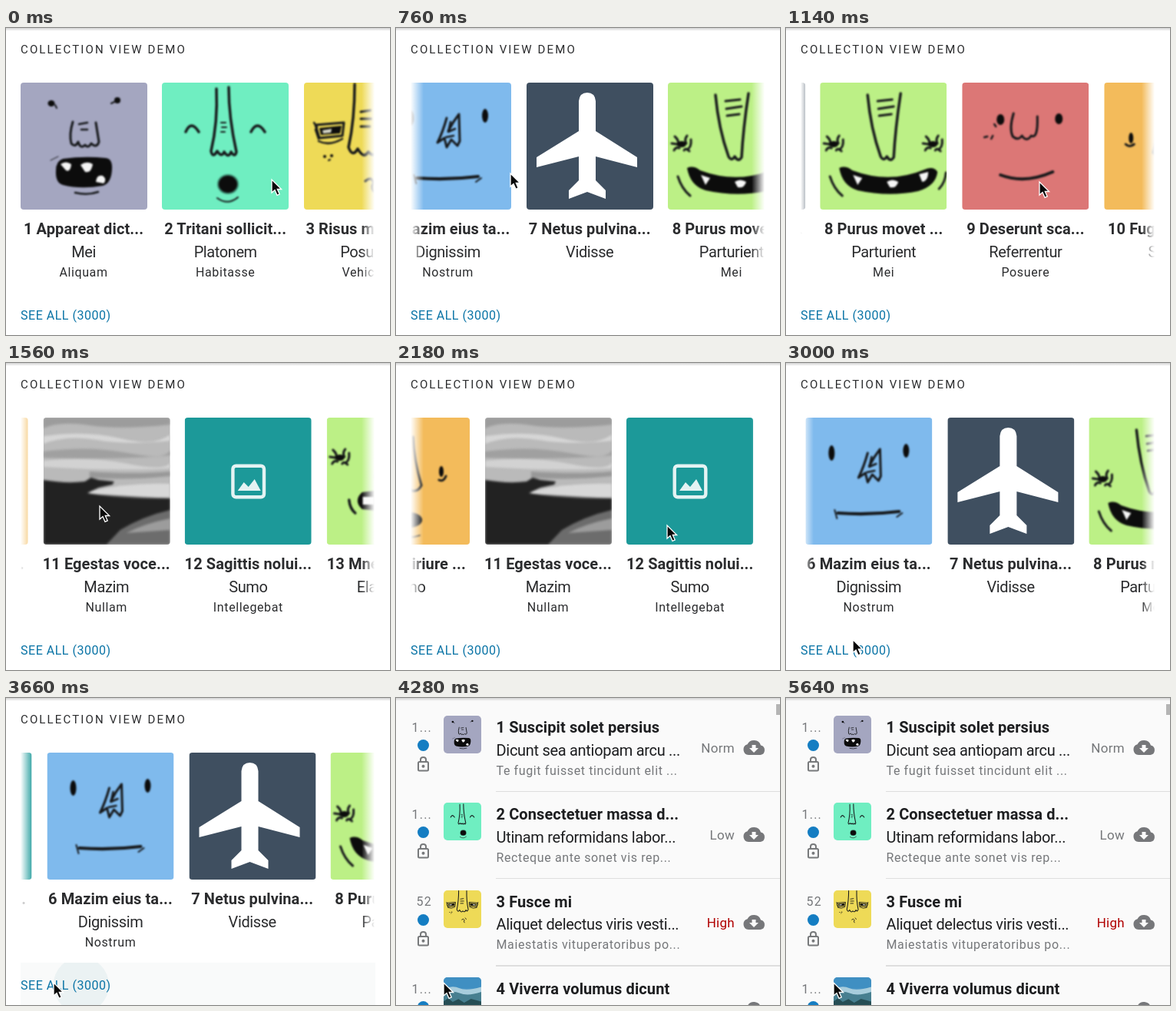
An HTML page for the animation above (5.66 s loop, 500 by 399 pixels).

```html
<!DOCTYPE html>
<html lang="la">
<head>
<meta charset="utf-8">
<title>Collection view demo</title>
<style>
  html, body { margin: 0; width: 100%; height: 100%; overflow: hidden; background: #fff; }
  #stage { position: relative; width: 500px; height: 399px; overflow: hidden; background: #fff;
    font: 16px/24px Roboto, "Open Sans", sans-serif; color: #2b2c2e; white-space: nowrap; }
  #stage div, #stage svg { position: absolute; }
  .edge { left: 0; top: 0; width: 500px; height: 4px; background: linear-gradient(#d2d2d2, #d2d2d200); }
  .head { left: 19px; top: 15.5px; font-size: 15px; letter-spacing: 2.14px; }
  .view { left: 18.5px; top: 71px; width: 461px; height: 265px; overflow: hidden; }
  .card { top: 0; width: 165px; text-align: center; }
  .card svg { left: 0; top: 0; width: 165px; height: 165px; border-radius: 4px; }
  .card div { left: -10px; width: 185px; }
  .t1 { font-size: 20px; font-weight: 700; letter-spacing: .1px; }
  .t2 { font-size: 20px; letter-spacing: -.4px; }
  .t3 { font-size: 16px; letter-spacing: .62px; }
  .card .t1 { top: 178px; } .card .t2 { top: 208px; } .card .t3 { top: 234.5px; }
  .fade { top: 0; width: 17px; height: 265px; }
  #fadeL { left: 0; background: linear-gradient(90deg, #fff, #fff0); }
  #fadeR { right: 0; background: linear-gradient(270deg, #fff, #fff0); }
  #hot { left: 19px; top: 344px; width: 462px; height: 55px; overflow: hidden; background: #f9fafa; }
  #ripple { left: -200px; top: -171px; width: 400px; height: 400px; border-radius: 50%; background: #ebf2f3; }
  .all { left: 19px; top: 361.5px; color: #0a74a6; letter-spacing: .52px; }
  #list { left: 0; top: 0; width: 500px; height: 399px; background: #fafafa; overflow: hidden; }
  .row { left: 0; width: 500px; height: 114px; color: #1d1e20; }
  .row .thumb { left: 62px; top: 23px; width: 49px; height: 49px; border-radius: 5px; }
  .row .t1, .row .t2, .row .t3 { left: 130.5px; }
  .row .t1 { top: 26px; } .row .t2 { top: 55.5px; } .row .t3 { top: 82.5px; color: #75777a; }
  .row .t2 { letter-spacing: -.3px; }
  .num { right: 453px; top: 26.5px; color: #75777a; letter-spacing: 1.2px; }
  .dot { left: 28px; top: 54px; width: 15px; height: 15px; border-radius: 50%; background: #147dc2; }
  .lock { left: 27px; top: 75px; width: 17px; height: 22px; }
  .cloud { left: 451px; top: 53px; width: 30px; height: 22px; }
  .prio { right: 59px; top: 53px; font-size: 17px; color: #75777a; letter-spacing: .3px; }
  .prio.High { color: #b00000; }
  .line { left: 130px; top: 120.5px; width: 370px; height: 1.5px; background: #dedede; }
  .bar { left: 495px; top: 8px; width: 5px; height: 14px; background: #b5b5b5; }
  #cursor { left: 0; top: 0; width: 18px; height: 24px; overflow: visible; }
</style>
</head>
<body>
<div id="stage">
  <div class="head">COLLECTION VIEW DEMO</div>
  <div class="view">
    <div id="strip"></div>
    <div class="fade" id="fadeL"></div>
    <div class="fade" id="fadeR"></div>
  </div>
  <div id="hot"><div id="ripple"></div></div>
  <div class="all">SEE ALL (3000)</div>
  <div id="list"></div>
  <div class="edge"></div>
  <svg id="cursor"><path d="M0 0V17L4 13.6 7 20.3 10.2 18.9 7.3 12.5H12.6Z" fill="#080808" stroke="#fff" stroke-width="1.3"/></svg>
</div>
<script>
const LOOP = 5660, PITCH = 184.7;
const $ = id => document.getElementById(id);

// Drawing helpers, all in a 165 x 165 square
const fill = (d, c = '#0c0c0c') => `<path d="${d}" fill="${c}"/>`;
const ink = (d, w = 3) =>
  `<path d="${d}" fill="none" stroke="#16181a" stroke-width="${w}" stroke-linecap="round" stroke-linejoin="round"/>`;
const oval = (x, y, rx, ry, c = '#0c0c0c') => `<ellipse cx="${x}" cy="${y}" rx="${rx}" ry="${ry}" fill="${c}"/>`;
const blur = (r, body) => `<g style="filter:blur(${r}px)">${body}</g>`;
const fuzzy = body => blur(.9, body);
const squint = (x, y) => `<g transform="translate(${x} ${y})">` +
  ink('M-9 -9Q-3 -4 -5 2M-13 0L-6 1M-10 9Q-8 4 -3 6M7 -10Q3 -5 6 0M12 -5Q13 5 7 8M3 9Q5 5 10 10') + oval(0, 1, 6, 4) + '</g>';
const glasses = (x, flip) => `<g transform="translate(${x} 63) scale(${flip} 1)">` +
  ink('M-18 -8L19 -11 17 6 -13 9Z') + fill('M-13 -4L16 -7 14 3 -11 5Z') + fill('M-9 -1L3 -3 2 2 -8 3Z', '#d6d7c8') +
  ink('M-20 -11L-16 -5M-14 13Q0 20 17 10M-18 -2L-14 10', 2.5) + '</g>';

const art = {
  violet: ['#a4a6c0', fuzzy(
    oval(40, 27, 4.5, 4) + ink('M45 29L47 33M118 27L122 25', 2) + oval(126, 23, 4, 4) +
    ink('M68 51Q63 67 66 79Q71 85 75 77Q78 87 84 81Q88 86 92 79Q99 86 102 77L98 52', 3) +
    ink('M76 54L87 52M79 61H87', 2.5) + ink('M39 101L49 96', 1) +
    fill('M55 99Q83 95 111 98Q120 99 119 113Q118 131 107 134Q78 139 55 133Q45 130 46 114Q46 102 55 99') +
    fill('M52 106Q59 101 66 106Q65 117 59 114ZM78 107Q86 101 94 106Q92 118 84 116ZM98 129Q99 119 107 121Q113 126 108 131Z', '#f4f4f4') +
    ink('M71 143Q87 147 101 142', 2.5))],
  mint: ['#6feec1', fuzzy(
    ink('M31 64Q38 48 48 64M116 64Q124 48 134 64', 3.5) +
    ink('M71 8Q73 52 64 89Q66 99 72 89Q78 98 81 90Q87 99 90 90Q95 98 97 90Q87 45 87 6', 3.5) +
    ink('M77 52H83M78 58H84M77 64H82', 2) + oval(86, 132, 14, 13, '#3c826c') + oval(86, 132, 12, 11) +
    ink('M72 150Q86 160 99 149', 2))],
  gold: ['#eeda57', fuzzy(
    glasses(33, 1) + glasses(131, -1) +
    ink('M66 2Q66 48 58 84Q63 98 70 86Q78 100 84 90Q92 99 98 86Q104 96 108 84Q100 48 101 2', 3.5) +
    ink('M74 38L87 36M74 47H88M74 57H86', 3) + oval(27, 96, 2, 2) + oval(36, 95, 2, 2) + ink('M32 101L34 100', 2) +
    ink('M80 128Q88 121 91 130Q87 136 91 141M95 121L99 126', 3))],
  lake: ['#5a9fca',
    fill('M0 0H165V50H0Z', '#3f8fc2') + fill('M0 50Q40 34 70 48T165 42V90H0Z', '#a8cddc') +
    fill('M0 75Q35 54 70 69T165 64V115H0Z', '#477f90') + fill('M0 105L20 92 40 108 65 95 90 111 120 94 165 106V165H0Z', '#264e55')],
  teal: ['#1c9999',
    '<rect x="62.7" y="62.7" width="40.6" height="40.6" rx="4" fill="none" stroke="#e4f3f3" stroke-width="4.4"/>' +
    fill('M69 95L77 84 83 90 91 80 99 95Z', '#e4f3f3')],
  sky: ['#7fbaed', fuzzy(
    oval(34, 46, 4, 10) + oval(131, 43, 4, 9) +
    ink('M81 46Q76 64 69 78L78 72 81 84 87 74 95 82 98 76 97 41Q89 51 83 63', 3) +
    ink('M86 51L83 64 92 60M80 71L90 69', 2.5) + ink('M42 124Q82 127 122 122', 4) +
    ink('M38 120L41 131M119 129L126 124', 2))],
  plane: ['#3f4f60', fill('M68 24Q69 13 79 13Q89 13 90 24V63L144 97V110L90 96V127L103 140V151L79 142 55 151V140L68 127V96L13 110V97L68 63Z', '#fff')],
  lime: ['#bcf086', fuzzy(
    squint(18, 79) + squint(147, 79) +
    ink('M62 16Q66 60 79 96Q83 103 87 96Q92 104 96 97Q98 60 105 14', 3.5) +
    ink('M75 24L94 22M76 34L96 31M77 43L93 41', 3) +
    fill('M25 111Q33 107 42 114Q90 132 136 113Q148 108 153 116Q151 134 128 141Q89 149 49 140Q29 134 25 111') +
    fill('M43 120L55 124 49 133ZM87 129Q94 124 102 129Q99 138 91 136ZM129 119L141 116Q141 128 133 129Z', '#f7f7f7') +
    ink('M13 122Q18 138 29 147M164 117Q163 130 155 138', 3))],
  fern: ['#bcf086', fuzzy(
    squint(17, 51) + squint(147, 51) +
    ink('M68 12Q70 50 64 78Q82 96 101 78Q95 45 98 12', 3.5) +
    fill('M46 97Q84 92 122 97Q132 108 122 119Q84 124 46 119Q34 108 46 97') +
    fill('M47 103H62V113H47ZM80 102H92V112H80Z', '#f7f7f7') + ink('M29 107Q30 118 37 124M137 107Q136 118 129 124', 3.5))],
  rose: ['#dc7776', fuzzy(
    oval(50, 48, 5, 7) + oval(126, 47, 5, 7) + ink('M42 54L44 57M29 71L33 70M38 73L40 69', 2.5) +
    ink('M67 40Q61 60 66 70Q73 76 78 69Q84 78 90 69Q99 74 98 44', 3) + ink('M50 120Q82 132 118 116', 4))],
  amber: ['#f3bb5b', fuzzy(
    oval(35, 72, 3, 7) + oval(128, 70, 3, 7) + ink('M28 80Q33 85 39 80M125 81Q131 84 134 76', 3) +
    ink('M72 24Q72 66 64 91Q75 99 82 92Q96 100 102 88Q92 55 91 25', 3) +
    oval(86, 133, 17, 10) + ink('M71 153Q86 158 100 153', 1.5))],
  shore: ['#bababa', blur(1.6,
    fill('M0 0H165V9Q100 16 60 10T0 14Z', '#9c9c9c') + fill('M0 24Q55 16 100 27T165 22V30Q110 36 70 29T0 34Z', '#d6d6d6') +
    fill('M0 44Q60 36 110 46T165 42V49Q100 55 0 52Z', '#a0a0a0') +
    fill('M0 56Q60 50 110 60T165 58V66Q100 70 0 64Z', '#d2d2d2') +
    fill('M60 70Q120 74 165 70V76Q110 82 60 78Z', '#989898') + fill('M60 96Q110 84 165 86V103Q100 105 60 99Z', '#d8d8d8') +
    fill('M60 99L165 105V165H40Z', '#6c6c6c') +
    fill('M0 81Q30 86 54 83L62 78 72 81 92 83 90 87 72 91 57 98 75 101Q115 106 165 105V120Q130 128 100 146L82 165H0Z', '#222') +
    fill('M165 131Q130 138 108 150L165 146Z', '#9c9c9c'))],
};
const picture = (name, cls = '') => {
  const [back, body] = art[name];
  return `<svg class="${cls}" viewBox="0 0 165 165"><rect width="165" height="165" fill="${back}"/>${body}</svg>`;
};
const lines = (a, b, c) => `<div class="t1">${a}</div><div class="t2">${b}</div><div class="t3">${c}</div>`;

const cards = [
  ['violet', 'Appareat dict...', 'Mei', 'Aliquam'],
  ['mint', 'Tritani sollicit...', 'Platonem', 'Habitasse'],
  ['gold', 'Risus mentitu...', 'Posuere', 'Vehicula'],
  ['lake', 'Viverra solet...', 'Dicunt', 'Recteque'],
  ['teal', 'Fusce delect...', 'Tempor', 'Natoque'],
  ['sky', 'Mazim eius ta...', 'Dignissim', 'Nostrum'],
  ['plane', 'Netus pulvina...', 'Vidisse', ''],
  ['lime', 'Purus movet ...', 'Parturient', 'Mei'],
  ['rose', 'Deserunt sca...', 'Referrentur', 'Posuere'],
  ['amber', 'Fugat iriure ...', 'Sumo', ''],
  ['shore', 'Egestas voce...', 'Mazim', 'Nullam'],
  ['teal', 'Sagittis nolui...', 'Sumo', 'Intellegebat'],
  ['fern', 'Mnesarchum...', 'Elaboraret', 'Mei'],
  ['sky', 'Tincidunt elit...', 'Norma', 'Vidisse'],
];
$('strip').innerHTML = cards.map(([pic, title, sub, note], i) =>
  `<div class="card" style="left:${i * PITCH}px">${picture(pic)}${lines(`${i + 1} ${title}`, sub, note)}</div>`).join('');

const rows = [
  ['violet', '1...', 'Norm', '1 Suscipit solet persius', 'Dicunt sea antiopam arcu ...', 'Te fugit fuisset tincidunt elit ...'],
  ['mint', '1...', 'Low', '2 Consectetuer massa d...', 'Utinam reformidans labor...', 'Recteque ante sonet vis rep...'],
  ['gold', '52', 'High', '3 Fusce mi', 'Aliquet delectus viris vesti...', 'Maiestatis vituperatoribus po...'],
  ['lake', '1...', 'Norm', '4 Viverra volumus dicunt', 'Mazim eius tamquam nolui...', 'Natoque sonet vis elit ...'],
];
const lock = `<svg class="lock" viewBox="0 0 17 22"><g fill="none" stroke="#77797b" stroke-width="2">
  <rect x="2" y="8" width="13" height="11.5" rx="1.5"/><path d="M5 8V5Q5 2 8.5 2T12 5V8"/></g>
  <circle cx="8.5" cy="13.7" r="2" fill="#77797b"/></svg>`;
const cloud = `<svg class="cloud" viewBox="0 0 30 22">
  <path d="M8 21A7 7 0 0 1 6.5 7.3A9.5 9.5 0 0 1 24 8.6A6.3 6.3 0 0 1 23.5 21Z" fill="#76777a"/>
  <path d="M12.5 8H17.5V12H21L15 18 9 12H12.5Z" fill="#fafafa"/></svg>`;
$('list').innerHTML = rows.map(([pic, num, prio, ...text], i) =>
  `<div class="row" style="top:${i * 113.4}px">${picture(pic, 'thumb')}<div class="num">${num}</div>
  <div class="dot"></div>${lock}${lines(...text)}<div class="prio ${prio}">${prio}</div>${cloud}<div class="line"></div></div>`
).join('') + '<div class="bar"></div>';

// Smooth curve through [time, value] points that never overshoots
function curve(points) {
  const slope = i => (points[i + 1][1] - points[i][1]) / (points[i + 1][0] - points[i][0]);
  const tangent = points.map((_, i) => {
    if (!i || i === points.length - 1) return 0;
    const a = slope(i - 1), b = slope(i);
    return a * b <= 0 ? 0 : 2 * a * b / (a + b);
  });
  return t => {
    if (t >= points.at(-1)[0]) return points.at(-1)[1];
    const i = points.findIndex((p, k) => t < points[k + 1][0]);
    const [t0, v0] = points[i], [t1, v1] = points[i + 1];
    const h = t1 - t0, u = (t - t0) / h, w = 1 - u;
    return w * w * ((1 + 2 * u) * v0 + u * h * tangent[i]) + u * u * ((3 - 2 * u) * v1 - w * h * tangent[i + 1]);
  };
}
const scroll = curve([[0, 0], [260, 180], [760, 957], [1150, 1275], [1390, 1480], [1560, 1817.3],
  [1880, 1980], [2180, 1750], [2600, 1100], [3060, 908], [3440, 888.5]]);
const mouseX = curve([[0, 346], [280, 160], [560, 149], [760, 149], [1140, 330], [1400, 128], [1560, 122],
  [1860, 130], [2180, 353], [2600, 147], [3400, 62]]);
const mouseY = curve([[0, 197], [760, 189], [1140, 200], [1560, 186], [2180, 211], [2600, 333], [3400, 370]]);
const ramp = (t, from, to) => Math.min(1, Math.max(0, (t - from) / (to - from)));

const start = performance.now();
function draw() {
  // The picture advances in steps of 20 ms
  const t = Math.floor((performance.now() - start) % LOOP / 20) * 20;
  const x = scroll(t);
  $('strip').style.transform = `translateX(${-x}px)`;
  $('fadeL').style.opacity = ramp(x, 0, 15);
  $('cursor').style.transform = `translate(${mouseX(t)}px, ${mouseY(t)}px)`;

  const press = ramp(t, 3600, 3915);
  $('hot').style.opacity = ramp(t, 3540, 3620);
  $('ripple').style.transform = `translateX(${43 + 188 * press}px) scale(${press * 0.95})`;

  const rise = (1 - ramp(t, 3860, 4280)) ** 3;
  $('list').style.opacity = ramp(t, 3860, 4040);
  $('list').style.transform = `translateY(${40 * rise}px)`;
  requestAnimationFrame(draw);
}
draw();
</script>
</body>
</html>
```
